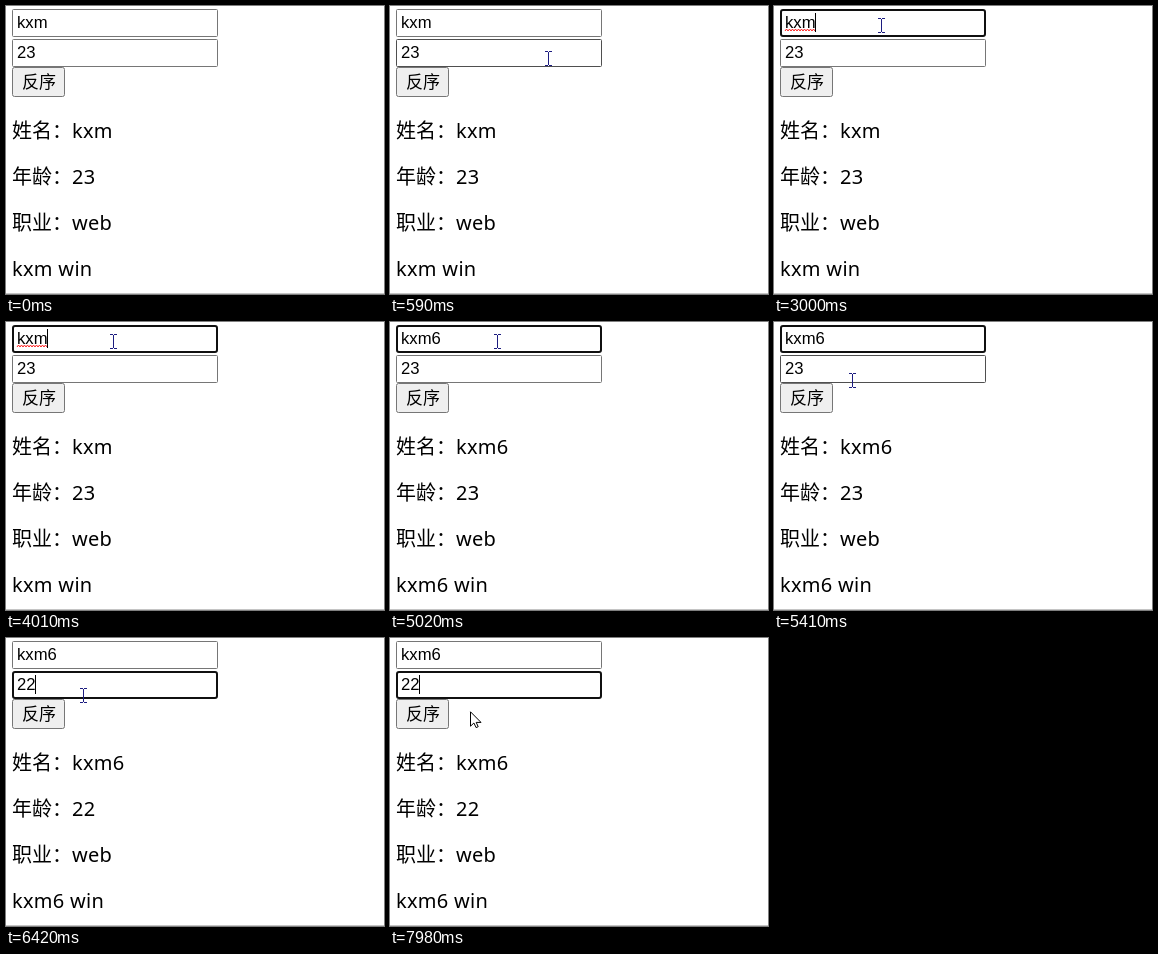
Write an HTML page that moves like this. It is 378 px wide and 288 px high and loops after 8 s.

```html
<!DOCTYPE html>
<html lang="zh-CN">
<head>
<meta charset="utf-8">
<title>Form demo</title>
<style>
  html, body { margin: 0; width: 100%; height: 100%; overflow: hidden; background: #fff; }
  svg { display: block; }
  text { white-space: pre; }
  .field { font: 16.67px "Liberation Sans", Arial, sans-serif; }
  .button { font: 300 17px "Noto Sans CJK SC", "Noto Sans CJK", sans-serif; }
  .para { font: 20px "Noto Sans", "Noto Sans CJK SC", "Noto Sans CJK", sans-serif; letter-spacing: .3px; }
  .label { font: 300 20px "Noto Sans CJK SC", "Noto Sans CJK", sans-serif; }
</style>
</head>
<body>
<svg width="378" height="288" viewBox="0 0 378 288">
  <rect width="378" height="288" fill="#fff"/>
  <rect id="box0" fill="#fff"/>
  <rect id="box1" fill="#fff"/>
  <text id="in0" class="field" x="11" y="22"></text>
  <text id="in1" class="field" x="11" y="52"></text>
  <path id="wave" fill="none" stroke="#f22" stroke-width="1"/>
  <rect id="caret" width="1" height="19"/>

  <rect x="6.5" y="61.5" width="52" height="29" rx="2" fill="#efefef" stroke="#767676"/>
  <text class="button" x="16" y="82">反序</text>

  <text class="label" x="6" y="132">姓名：</text>
  <text class="label" x="6" y="178">年龄：</text>
  <text class="label" x="6" y="224">职业：</text>
  <text id="name" class="para" x="66" y="132"></text>
  <text id="age" class="para" x="66" y="178"></text>
  <text class="para" x="66" y="224">web</text>
  <text id="win" class="para" x="6" y="270"></text>
  <rect y="287" width="378" height="1" fill="#c4c4c4"/>

  <circle id="glow" r="15" fill="#ff0" fill-opacity=".5"/>
  <path id="beam" fill="none" d="M-3 -6.5H0M1 -6.5H4M.5 -6V7M-3 7.5H0M1 7.5H4"/>
  <path id="arrow" fill="#fff" stroke="#000" stroke-linejoin="miter"
        d="M.5 .8V15.2L3.9 12 6.1 16.6 8.2 15.7 6.2 11.4H11Z"/>
</svg>
<script>
const LOOP = 8000;
const $ = id => document.getElementById(id);
const set = (el, attrs) => { for (const k in attrs) el.setAttribute(k, attrs[k]); };
const show = (el, on) => set(el, { visibility: on ? 'visible' : 'hidden' });
const write = (id, s) => { if ($(id).textContent !== s) $(id).textContent = s; };

// Pointer stops: time, x, y, shape
const pointer = [
  [290, 283, 256, 'arrow'], [370, 250, 188, 'arrow'], [440, 204, 112, 'arrow'],
  [520, 158, 52, 'beam'], [600, 120, 25, 'beam'], [670, 107, 19, 'beam'],
  [5100, 103, 22, 'beam'], [5180, 91, 41, 'beam'], [5260, 79, 62, 'arrow'],
  [5410, 78, 58, 'beam'], [5490, 77, 57, 'beam'],
  [7750, 77, 59, 'beam'], [7830, 78, 66, 'arrow'], [7900, 79, 71, 'arrow'], [7980, 80, 73, 'arrow']
];

// Each time flips the caret; focus and typing make it visible again
const blinks = [900, 1440, 1900, 2450, 3000, 3550, 4010, 5020, 5560, 6100, 6350, 6970, 7520];

const within = (t, a, b) => t >= a && t < b;

let wave = 'M11 25';
for (let x = 12.5, up = true; x <= 41; x += 1.5, up = !up) wave += `L${x} ${up ? 23 : 25}`;
set($('wave'), { d: wave });

function drawBox(i, focused, hover) {
  const inset = focused ? 1 : 0.5;
  set($('box' + i), {
    x: 6 + inset, y: 3 + 30 * i + inset,
    width: 206 - 2 * inset, height: 28 - 2 * inset,
    rx: 2 * inset,
    stroke: focused ? '#101010' : hover ? '#4f4f4f' : '#767676',
    'stroke-width': 2 * inset
  });
}

function render(t) {
  const name = t < 4470 ? 'kxm' : 'kxm6';
  const age = t < 6350 ? '23' : t < 6420 ? '2' : '22';
  const focus = t < 900 ? -1 : t < 5560 ? 0 : 1;
  const clicked = within(t, 900, 980) || within(t, 5560, 5640);
  const stop = pointer.filter(p => p[0] <= t).pop();
  const [, px, py, shape] = stop || [0, 0, 0, ''];

  write('in0', name);
  write('in1', age);
  write('name', name);
  write('age', age);
  write('win', name + ' win');

  for (const i of [0, 1]) {
    const hover = shape === 'beam' && within(py, 3 + 30 * i, 31 + 30 * i);
    drawBox(i, focus === i, hover);
  }

  show($('wave'), within(t, 900, 4470));
  const flips = blinks.filter(b => b <= t).length;
  const caretX = focus === 0 ? (name.length > 3 ? 50 : 41) : (age.length > 1 ? 29 : 20);
  set($('caret'), { x: caretX, y: focus === 1 ? 37 : 7 });
  show($('caret'), flips % 2 === 1);

  for (const id of ['arrow', 'beam']) {
    set($(id), { transform: `translate(${px} ${py})` });
    show($(id), shape === id);
  }
  set($('beam'), { stroke: clicked ? '#77774a' : '#1c1c80' });
  set($('glow'), { cx: px, cy: py });
  show($('glow'), clicked);
}

const start = performance.now();
function tick() {
  render((performance.now() - start) % LOOP);
  requestAnimationFrame(tick);
}
tick();
</script>
</body>
</html>
```
